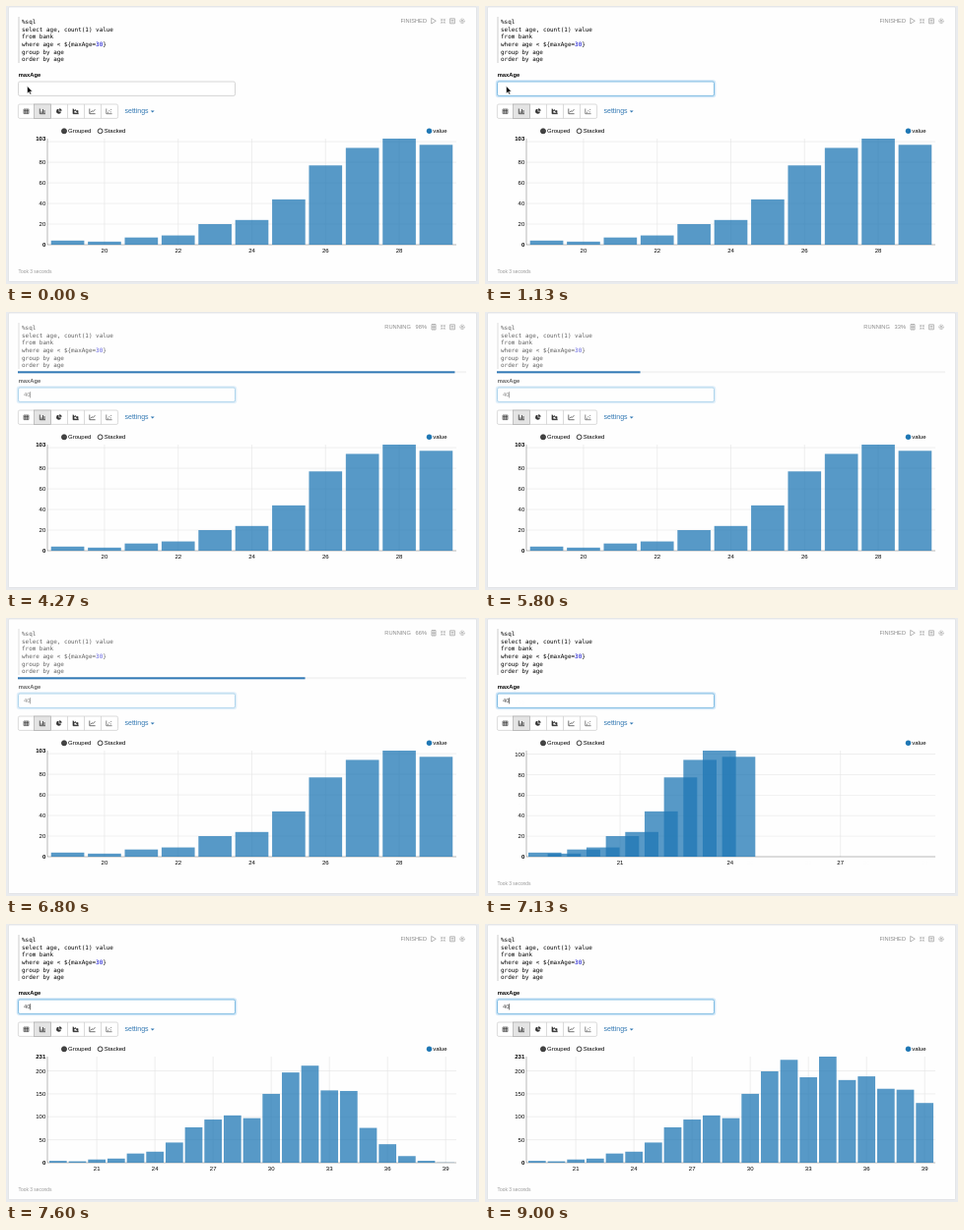
Recreate the animation shown at these times as an HTML page. Size 480 by 283 pixels, loop 9070 ms.

```html
<!DOCTYPE html>
<html lang="en">
<head>
<meta charset="utf-8">
<title>Query with a dynamic form</title>
<style>
  html, body { margin: 0; width: 100%; height: 100%; overflow: hidden; background: #e9ebee; }
  svg { display: block; width: 100vw; height: 100vh; }
  text { font: 6px "Liberation Sans", Arial, sans-serif; white-space: pre; }
  .code text { font: 5.95px "DejaVu Sans Mono", monospace; }
  .bold { font-weight: 700; }
  .end { text-anchor: end; }
  .mid { text-anchor: middle; }
  .grid { stroke: #e4e4e4; stroke-width: .6; }
  .bar { fill: #1f77b4; fill-opacity: .75; }
  .tools { fill: none; stroke: #9a9a9a; stroke-width: .7; }
  .icons { fill: none; stroke: #333; stroke-width: .7; }
</style>
</head>
<body>
<svg viewBox="0 0 480 283">
  <rect width="480" height="283" fill="#e9ebee"/>
  <rect x="2.5" y="1" width="475" height="279.5" rx="1" fill="#fefefe" stroke="#d8dadd" stroke-width=".6"/>

  <g class="code dim">
    <path d="M13 11V58" stroke="#ccc" stroke-width="1"/>
    <text x="16" y="18">%sql</text>
    <text x="16" y="25.6">select age, count(1) value</text>
    <text x="16" y="33.3">from bank</text>
    <text x="16" y="41">where age &lt; ${maxAge=<tspan fill="#0000cd">30</tspan>}</text>
    <text x="16" y="48.7">group by age</text>
    <text x="16" y="56.4">order by age</text>
  </g>

  <text id="status" class="end" x="427" y="17.4" fill="#8a8a8a" style="font-size:5.7px"></text>
  <g class="tools">
    <path id="play" d="M431.7 12.4L436.3 15.2L431.7 18Z"/>
    <path id="stop" d="M432 12.5H436V18H432ZM434 12.5V18M432 15.2H436"/>
    <path d="M441 12.8L442.7 14.5M446 12.8L444.3 14.5M441 17.8L442.7 16.1M446 17.8L444.3 16.1M441 14.5H442.7V12.8M446 14.5H444.3V12.8M441 16.1H442.7V17.8M446 16.1H444.3V17.8" stroke-width=".5"/>
    <path d="M450.6 12.8H455.4V17.8H450.6ZM451.6 14.4H454.4M451.6 16H454.4"/>
    <circle cx="463" cy="15.3" r="2.3" stroke-dasharray="1.2 .6"/>
    <circle cx="463" cy="15.3" r="1"/>
  </g>

  <g id="progress">
    <rect x="12" y="60.3" width="455" height="2" fill="#f3f3f3"/>
    <rect id="fill" x="12" y="60.3" height="2" fill="#337ab7"/>
  </g>

  <g class="dim">
    <text class="bold" x="12.7" y="72" style="font-size:5.8px">maxAge</text>
    <rect id="glow" x="11.7" y="76.2" width="221.6" height="16" rx="2.3" fill="none" stroke="#66afe9" stroke-opacity=".3" stroke-width="2"/>
    <rect id="field" x="12.5" y="77" width="220" height="14.4" rx="1.6" fill="#fff" stroke-width=".8"/>
    <text id="typed" x="18" y="86.3" fill="#444" style="font-size:5.7px"></text>
    <path id="caret" stroke="#111" stroke-width=".6"/>
  </g>
  <path id="pointer" d="M21.6 81.6V89L23.3 87.5L24.5 90L25.7 89.4L24.5 87.1H26.7Z" stroke="#fff" stroke-width=".5"/>

  <g stroke="#ccc" stroke-width=".7">
    <rect x="12.4" y="100" width="101.2" height="14.4" rx="1.6" fill="#fff"/>
    <path d="M62.5 100V114.4M79.5 100V114.4M96.5 100V114.4"/>
    <rect x="28.6" y="100" width="17" height="14.4" fill="#e4e4e4" stroke="#adadad"/>
  </g>
  <g class="icons">
    <path d="M18 105H23V109.6H18ZM18 106.5H23M18 108H23M19.7 105V109.6M21.4 105V109.6" stroke-width=".6"/>
    <path d="M34.3 104.5V109.7H40M36 109V107.4M37.5 109V105M39 109V106" stroke-width=".8"/>
    <path d="M53.5 107.4V104.8A2.5 2.5 0 1 0 56 107.4Z" fill="#333" stroke="none"/>
    <path d="M54.1 106.8V104.3A2.5 2.5 0 0 1 56.6 106.8Z" fill="#333" stroke="none"/>
    <path d="M68 104.5V109.7H73.8M69 109V107.2L70.3 105.6L71.8 107L73 106.4V109Z" fill="#333"/>
    <path d="M84.8 104.5V109.7H90.6M85.8 108.4L87.3 106.8L88.3 107.5L90.4 105.2"/>
    <path d="M101.8 104.5V109.7H107.6M103 108.3H104M104.3 106.7H105.3M105.8 107.9H106.8M106.2 105.4H107.2" stroke-width=".6"/>
  </g>
  <g fill="#3278b3">
    <text x="120.5" y="109.4" style="font-size:7px">settings</text>
    <path d="M146.8 106.4H150.6L148.7 108.4Z"/>
  </g>

  <circle cx="59" cy="127.3" r="2.6" fill="#444" stroke="#222" stroke-width=".6"/>
  <text x="63" y="129.4">Grouped</text>
  <circle cx="95.6" cy="127.3" r="2.4" fill="#fff" stroke="#222" stroke-width=".9"/>
  <text x="99.7" y="129.4">Stacked</text>
  <circle cx="429.5" cy="127.3" r="2.7" fill="#1f77b4"/>
  <text x="433.2" y="129.4">value</text>

  <g id="chart"></g>
  <text id="took" x="12.5" y="272.2" fill="#999" style="font-size:4.9px">Took 3 seconds</text>
</svg>

<script>
const LOOP = 9070, CLICK = 600, KEY_1 = 1770, KEY_2 = 2900, RUN = 3600, DONE = 7000, REDRAW = 7102;
const $ = id => document.getElementById(id);
const clamp = v => Math.max(0, Math.min(1, v));
const mix = (a, b, p) => a + (b - a) * p;
const show = (id, on) => { $(id).style.display = on ? '' : 'none'; };

const cubicInOut = t => t < .5 ? 4 * t ** 3 : 1 - 4 * (1 - t) ** 3;

// The CSS "ease" curve
function ease(t) {
  let lo = 0, hi = 1;
  const bezier = (a, b, s) => 3 * a * s * (1 - s) ** 2 + 3 * b * s * s * (1 - s) + s ** 3;
  for (let i = 0; i < 20; i++) {
    const s = (lo + hi) / 2;
    if (bezier(.25, .25, s) < t) lo = s; else hi = s;
  }
  return bezier(.1, 1, lo);
}

// Progress reports: [time, percent]; the bar eases towards each one
const REPORTS = [[3730, 98], [4870, 0], [5340, 33], [6380, 66]];
const percentAt = t => REPORTS.reduce((p, [at, v]) => t >= at ? v : p, 0);
function barAt(t, n = REPORTS.length) {
  while (n && REPORTS[n - 1][0] > t) n--;
  if (!n) return 0;
  const [at, value] = REPORTS[n - 1];
  return mix(barAt(at, n - 1), value, ease(clamp((t - at) / 600)));
}

// Chart geometry
const LEFT = 42, WIDTH = 415, BASE = 243, HEIGHT = 108, FIRST_AGE = 19, OLD = 11;
const COUNTS = [4, 3, 7, 9, 20, 24, 44, 77, 94, 103, 97,
  150, 199, 224, 186, 231, 180, 188, 161, 159, 130];
const bands = n => {
  const step = WIDTH / (n + .1);
  return { width: step * .9, x: i => LEFT + step * (i + .1) };
};
const before = bands(OLD), after = bands(COUNTS.length);
const scaleY = max => v => BASE - HEIGHT * v / max;
const yOld = scaleY(103), yNew = scaleY(231);

const label = (x, y, text, cls, alpha) =>
  `<text x="${x}" y="${y}" class="${cls}" opacity="${alpha}">${text}</text>`;
const yTick = (v, y, alpha, text = v) =>
  `<path class="grid" d="M${LEFT} ${y}h${WIDTH}" opacity="${alpha}"/>` +
  label(40.3, y + 2.1, text, 'end', alpha);
const yMax = (v, y, alpha) => label(40.3, y + 2.1, v, 'end bold', alpha);
const xTick = (age, x, alpha) =>
  `<path class="grid" d="M${x} ${BASE - HEIGHT}V${BASE}" opacity="${alpha}"/>` +
  label(x, 250.6, age, 'mid', alpha);

function axes(started, p) {
  let out = '';
  const yMove = v => mix(yOld(v), yNew(v), p);
  if (!started) {
    for (let v = 20; v <= 100; v += 20) out += yTick(v, yOld(v), 1, v < 100 ? v : '');
    out += yMax(103, yOld(103), 1);
    for (let age = 20; age < 30; age += 2)
      out += xTick(age, before.x(age - FIRST_AGE) + before.width / 2, 1);
  } else {
    if (p < 1) for (let v = 20; v <= 80; v += 20) out += yTick(v, yMove(v), 1 - p);
    for (let v = 50; v <= 200; v += 50) out += yTick(v, yMove(v), v === 100 ? 1 : p);
    out += yMax(231, yNew(231), p);
    for (let age = 21; age < 40; age += 3) {
      const i = age - FIRST_AGE, end = after.x(i) + after.width / 2;
      out += i < OLD ? xTick(age, mix(before.x(i) + before.width / 2, end, p), 1) : xTick(age, end, p);
    }
  }
  return out + yMax(0, BASE, 1) +
    `<path d="M${LEFT} ${BASE - HEIGHT}V${BASE}H${LEFT + WIDTH}" fill="none" stroke="#000" stroke-opacity=".55" stroke-width=".5"/>`;
}

function bars(elapsed) {
  const started = elapsed >= 0;
  return COUNTS.map((count, i) => {
    const isOld = i < OLD;
    if (!started && !isOld) return '';
    // Each bar starts a little after its left neighbour
    const p = cubicInOut(clamp((elapsed - i * 500 / COUNTS.length) / 250));
    const x = (started ? after : before).x(i);
    const width = isOld ? mix(before.width, after.width, p) : after.width;
    const y = mix(isOld ? yOld(count) : BASE, yNew(count), p);
    return `<rect class="bar" x="${x}" y="${y}" width="${width}" height="${BASE - y}"/>`;
  }).join('');
}

let drawn = '';
function drawChart(t) {
  const elapsed = t - REDRAW;
  const html = axes(elapsed >= 0, cubicInOut(clamp(elapsed / 250))) + bars(elapsed);
  if (html !== drawn) $('chart').innerHTML = drawn = html;
}

function caretOn(t) {
  if (t < CLICK) return false;
  if (t >= 4900) return true;
  const reset = t >= KEY_2 ? KEY_2 : t >= KEY_1 ? KEY_1 : CLICK;
  return (t - reset) % 1000 < 500;
}

function render(now) {
  const t = now % LOOP, running = t >= RUN && t < DONE;
  const typed = t >= KEY_2 ? '40' : t >= KEY_1 ? '4' : '';
  const focus = ease(clamp((t - CLICK) / 150));

  $('status').textContent = running ? `RUNNING\u00a0\u00a0\u00a0${percentAt(t)}%` : 'FINISHED';
  show('play', !running);
  show('stop', running);
  show('took', !running);
  show('progress', running);
  $('fill').setAttribute('width', 4.55 * barAt(t));
  document.querySelectorAll('.dim').forEach(g => g.setAttribute('opacity', running ? .62 : 1));

  $('field').setAttribute('stroke',
    `rgb(${mix(204, 102, focus)},${mix(204, 175, focus)},${mix(204, 220, focus)})`);
  $('glow').setAttribute('opacity', focus);
  $('typed').textContent = typed;
  $('caret').setAttribute('d', `M${18.3 + 3.17 * typed.length} 81.2V87.4`);
  show('caret', caretOn(t));
  show('pointer', t < KEY_1);
  drawChart(t);
}

const start = performance.now();
function tick() {
  render(performance.now() - start);
  requestAnimationFrame(tick);
}
tick();
</script>
</body>
</html>
```
